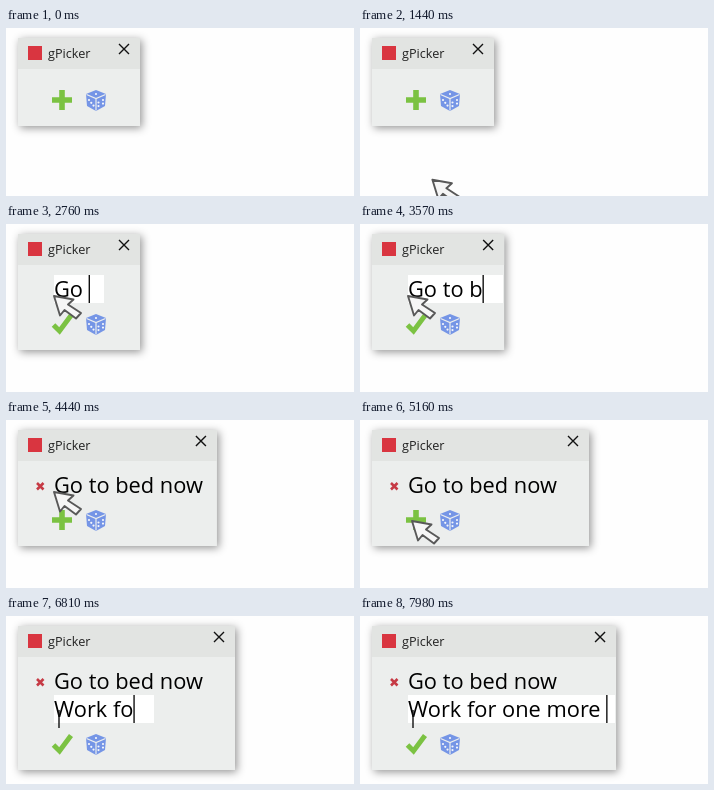
Write an HTML page that moves like this. It is 348x168 px and loops after 8000 ms.

```html
<!DOCTYPE html>
<html lang="en">
<head>
<meta charset="utf-8">
<title>gPicker</title>
<style>
  html, body { margin: 0; width: 100%; height: 100%; overflow: hidden; background: #fefefe; }
  #stage { display: block; }
  text { font-family: "Open Sans", "Noto Sans", sans-serif; white-space: pre; fill: #000; }
  .entry { font-size: 21.8px; }
  #frame { fill: #eceeed; filter: drop-shadow(2px 2px 4px rgba(0, 0, 0, .42)); }
  .line { fill: none; stroke: #111; stroke-width: 1.4; }
  .green { fill: none; stroke: #7bc242; }
  .pips { fill: none; stroke: #f4f6fb; stroke-width: 2.2; stroke-linecap: round; stroke-dasharray: 0 3.6; }
</style>
</head>
<body>
<svg id="stage" width="348" height="168" viewBox="0 0 348 168">
  <rect id="frame" x="12" y="10"/>
  <rect id="bar" x="12" y="10" height="31" fill="#e2e4e2"/>
  <rect x="22" y="18" width="14" height="14" fill="#d93540"/>
  <text x="42" y="30" font-size="12.7" style="fill:#222">gPicker</text>
  <path id="close" class="line" d="M-5-5L5 5M5-5L-5 5"/>

  <g id="saved">
    <path d="M31 63l6.5 6.5m0-6.500l-6.500 6.500" stroke="#c63a45" stroke-width="2.6"/>
    <text class="entry" x="48" y="73">Go to bed now</text>
  </g>

  <svg id="input" x="48" height="28">
    <rect width="100%" height="100%" fill="#fff"/>
    <text id="typed" class="entry" y="22"></text>
    <path id="caret" class="line" d="M.6 0V28"/>
  </svg>

  <g id="tools">
    <path id="plus" class="green" d="M56-10V10M46 0H66" stroke-width="5.6"/>
    <path id="check" class="green" d="M47.500 1L53.500 7L65-8.500" stroke-width="5"/>
    <path d="M90-10L100-6L99 6L90 11L81 6L80-6Z" fill="#7595e6"/>
    <path d="M80.500-5.500L90-1.500L99.500-5.500M90-1.500V10.500" fill="none" stroke="#eceeed" stroke-width="1.2"/>
    <path class="pips" d="M83 0L88 6.200M92.500 2.500V6.500M97 0V4.500M90-6h.1"/>
  </g>

  <path id="arrow" d="M0 0L19.500 3.500L14 8.500L27 17L22 22.500L10.500 14L6 19.500Z"
        fill="#f6f6f6" stroke="#585858" stroke-width="1.9" stroke-linejoin="round"/>
  <path id="beam" class="line" d="M53 94V112"/>
</svg>
<script>
const LOOP = 8000, ROW = 28, GROW = 880;
const FIRST = 1690, SAVE = 4260, SECOND = 5220;

const el = id => document.getElementById(id);
const set = (id, attrs) => {
  for (const key in attrs) el(id).setAttribute(key, attrs[key]);
};
const move = (id, x, y) => set(id, { transform: `translate(${x} ${y})` });
const show = (id, on) => set(id, { display: on ? "inline" : "none" });

// Smooth 0..1 progress from a start time over a duration
function ease(t, start, span) {
  const p = Math.min(1, Math.max(0, (t - start) / span));
  return p * p * (3 - 2 * p);
}

// Text is typed in bursts, each with its own start and pace
const entries = [
  { open: FIRST, end: SAVE, y: 51, bursts: [
    { text: "Go to", at: 2500, pace: 120 },
    { text: " bed now", at: 3400, pace: 95 }
  ] },
  { open: SECOND, end: LOOP, y: 51 + ROW, bursts: [
    { text: "Work ", at: 6060, pace: 120 },
    { text: "for ", at: 6690, pace: 90 },
    { text: "one more ", at: 7240, pace: 88 }
  ] }
];

const typedAt = (bursts, t) => bursts.map(({ text, at, pace }) =>
  text.slice(0, Math.max(0, Math.floor((t - at) / pace) + 1))).join("");

// The field doubles whenever its text no longer fits
function fieldWidth(text) {
  let width = 50;
  while (text + 4 > width) width *= 2;
  return width;
}

function drawInput(entry, right, t) {
  const text = typedAt(entry.bursts, t);
  if (el("typed").textContent !== text) el("typed").textContent = text;
  const length = text ? el("typed").getComputedTextLength() : 0;
  const width = Math.min(fieldWidth(length), right - 49);
  set("input", { y: entry.y, width });
  move("caret", Math.min(length, width - 2), 0);
}

function draw(t) {
  const right = 134 + 95 * ease(t, 3230, 1680) + 54 * ease(t, 7230, 1500);
  const bottom = 98 + ROW * (ease(t, FIRST, GROW) + ease(t, SECOND, GROW));
  set("frame", { width: right - 12, height: bottom - 10 });
  set("bar", { width: right - 12 });
  move("close", right - 16, 21);
  move("tools", 0, bottom - 26);

  const entry = entries.find(e => t >= e.open && t < e.end);
  show("saved", t >= SAVE);
  show("plus", !entry);
  show("check", entry);
  show("input", entry);
  if (entry) drawInput(entry, right, t);

  const enter = ease(t, 1350, 330), next = ease(t, 4520, 380);
  move("arrow", 78 - 30 * enter + 4 * next, 170 - 98 * enter + 29 * next);
  show("arrow", t >= 1350 && t < SECOND);
  show("beam", t >= SECOND);
}

const start = performance.now();
function tick() {
  draw((performance.now() - start) % LOOP);
  requestAnimationFrame(tick);
}
tick();
</script>
</body>
</html>
```
